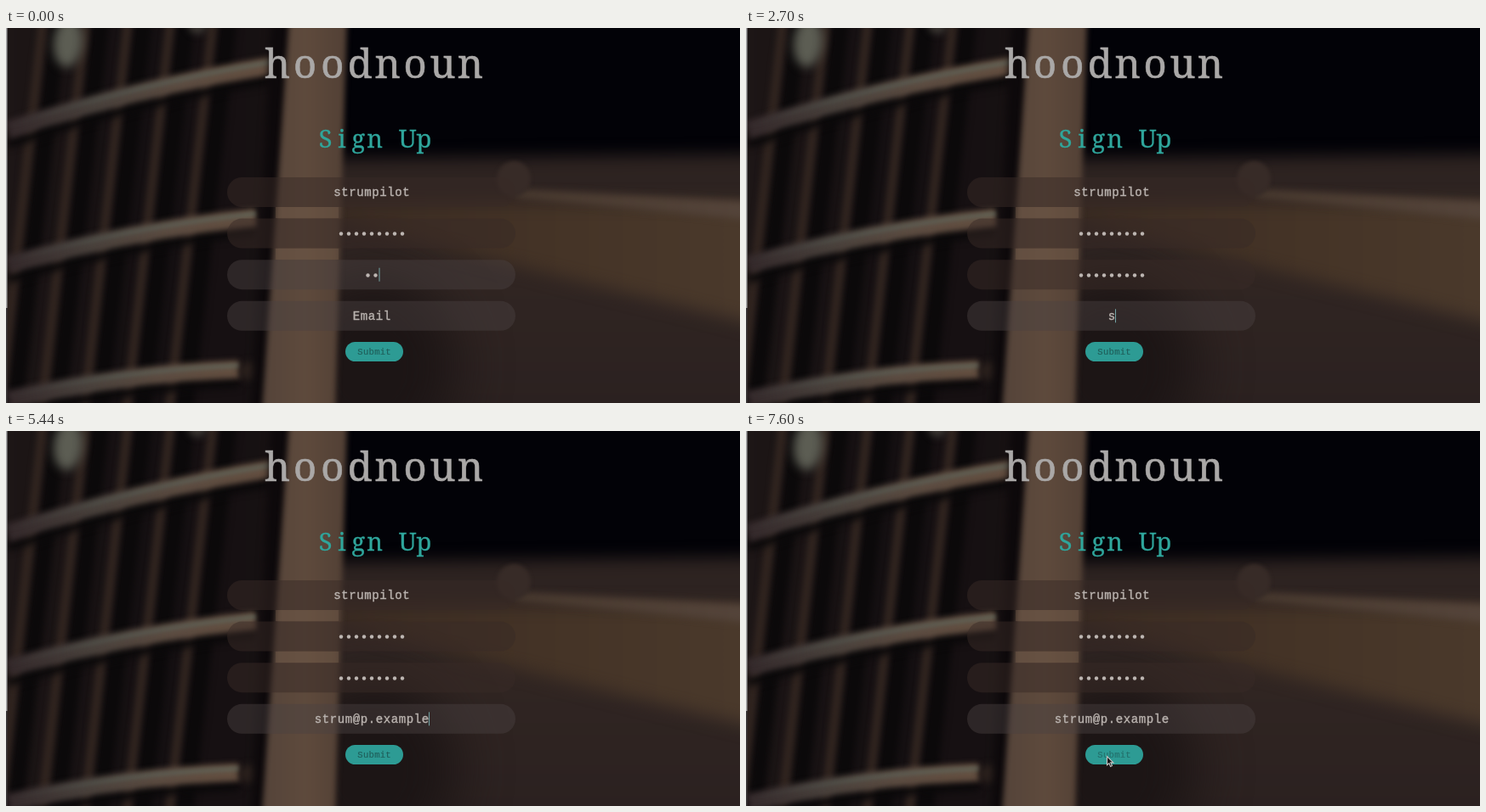
Recreate the animation shown at these times as an HTML page with a canvas. Size 863x442 px, loop 7620 ms.

```html
<!DOCTYPE html>
<html lang="en">
<head>
<meta charset="utf-8">
<title>Sign Up</title>
<style>
html, body { margin: 0; width: 100%; height: 100%; overflow: hidden; background: #060507; }
canvas { display: block; width: 863px; height: 442px; }
</style>
</head>
<body>
<canvas id="stage" width="863" height="442"></canvas>
<script>
const W = 863, H = 442, LOOP = 7620, MID = 430, CELL = 9;
const MONO = '"Liberation Mono", "Courier New", monospace';
const SERIF = '"Noto Serif", "Liberation Serif", serif';
const TITLE = 'hoodnoun', USER = 'strumpilot', MAIL = 'strum@p.example';
const ctx = document.getElementById('stage').getContext('2d');

function ramp(g, x0, y0, x1, y1, ...colors) {
  const fill = g.createLinearGradient(x0, y0, x1, y1);
  colors.forEach((c, i) => fill.addColorStop(i / (colors.length - 1), c));
  return fill;
}

function soft(g, blur, paint) {
  g.filter = `blur(${blur}px)`;
  g.beginPath();
  paint();
  g.filter = 'none';
}

// Strip from the top to the bottom of the stage, leaning by a shift in x.
function slant(g, color, blur, x, width, lean, endWidth = width) {
  soft(g, blur, () => {
    g.fillStyle = color;
    g.moveTo(x, -10);
    g.lineTo(x + width, -10);
    g.lineTo(x + lean + endWidth, H + 10);
    g.lineTo(x + lean, H + 10);
    g.fill();
  });
}

// Band from the neck to the right edge, given its top and height at both ends.
function beam(g, color, blur, x, y, h, endY, endH) {
  soft(g, blur, () => {
    g.fillStyle = color;
    g.moveTo(x, y);
    g.lineTo(W + 30, endY);
    g.lineTo(W + 30, endY + endH);
    g.lineTo(x, y + h);
    g.fill();
  });
}

function oval(g, color, blur, x, y, rx, ry) {
  soft(g, blur, () => {
    g.fillStyle = color;
    g.ellipse(x, y, rx, ry, 0.1, 0, 7);
    g.fill();
  });
}

function fret(g, y, endX, endY) {
  const arc = (color, width, blur, dy) => soft(g, blur, () => {
    g.strokeStyle = color;
    g.lineWidth = width;
    g.moveTo(2, y + dy);
    g.quadraticCurveTo(endX / 2, (y + endY) / 2 - 13 + dy, endX, endY + dy);
    g.stroke();
  });
  arc('#0b090a', 10, 4, 17);
  arc(ramp(g, 0, 0, endX, 0, '#33282a', '#48403b', '#5c4c41', '#644f40'), 21, 3, 0);
  arc(ramp(g, 0, 0, endX, 0, '#56605a00', '#5b6a6260', '#60706580'), 6, 2, -4);
}

function paintBackdrop() {
  const c = document.createElement('canvas');
  c.width = W;
  c.height = H;
  const g = c.getContext('2d');
  g.fillStyle = '#020207';
  g.fillRect(0, 0, W, H);

  // guitar body
  beam(g, ramp(g, 0, 150, 0, H, '#2c2220', '#302522', '#2b2120'), 9, 370, 154, 320, 148, 320);
  beam(g, ramp(g, 390, 0, W, 0, '#3a2b22', '#443326', '#4a392b'), 10, 370, 206, 18, 206, 146);
  beam(g, ramp(g, 590, 0, W, 0, '#493a2f', '#54443a'), 4, 598, 190, 10, 206, 22);
  oval(g, '#1c1515', 30, 430, 400, 100, 110);
  oval(g, '#372b27', 2, 597, 178, 20, 21);

  // fretboard and strings
  slant(g, ramp(g, 0, 0, 320, 0, '#1d1616', '#151012', '#171112'), 2, -70, 406, -28);
  for (let x = 44; x < 260; x += 50) {
    slant(g, '#0b090a', 4, x + 8, 20, -52);
    slant(g, '#30241f', 3, x - 6, 11, -52);
  }
  oval(g, '#5c5d53', 6, 73, 17, 17, 29);
  oval(g, '#3a3632', 4, 225, -3, 11, 10);
  for (let i = 0; i < 3; i++) fret(g, 120 + 159 * i, 314 - 20 * i, 44 + 179 * i);
  oval(g, '#2b211d', 4, 286, 404, 11, 11);

  // neck edge
  slant(g, '#0d090b', 5, 312, 24, -24);
  slant(g, ramp(g, 305, 0, 400, 0, '#55443a', '#5e4a3c', '#524035'), 3, 333, 68, -32, 86);
  for (const y of [211, 260]) {
    g.fillStyle = '#755d4a60';
    g.fillRect(317, y, 74, 13);
  }

  g.fillStyle = '#a9a9aa';
  g.fillRect(0, 0, 1.5, 330);
  g.fillStyle = '#3c393a';
  g.fillRect(0, 330, 1.5, H - 330);
  return c;
}

const backdrop = paintBackdrop();

function pill(x, y, w, h, color) {
  ctx.fillStyle = color;
  ctx.beginPath();
  ctx.roundRect(x, y, w, h, h / 2);
  ctx.fill();
}

// Text on an even grid, one letter centred in each cell.
function label(str, mid, base, font, cell, color, weight) {
  ctx.font = font;
  ctx.textAlign = 'center';
  ctx.fillStyle = ctx.strokeStyle = color;
  ctx.lineWidth = weight;
  [...str].forEach((ch, i) => {
    const x = mid + (i - (str.length - 1) / 2) * cell;
    ctx.fillText(ch, x, base);
    ctx.strokeText(ch, x, base);
  });
}

function field(row, text, lit, caretAt) {
  const y = 176 + row * 48.6;
  pill(260, y, 339, 35, lit ? 'rgba(74,65,65,.45)' : 'rgba(56,43,39,.5)');
  label(text, MID, y + 22, `14px ${MONO}`, CELL, '#b9b2ae', 0.4);
  if (caretAt >= 0) {
    ctx.fillStyle = '#74a5a6';
    ctx.fillRect(MID + caretAt * CELL / 2 - 0.5, y + 9.5, 1, 16);
  }
}

function dots(y, n) {
  ctx.fillStyle = '#bdb6b2';
  for (let i = 0; i < n; i++) {
    ctx.beginPath();
    ctx.arc(MID + (i - (n - 1) / 2) * CELL, y, 2.2, 0, 7);
    ctx.fill();
  }
}

function typed(t, start, step, max) {
  return Math.max(0, Math.min(max, 1 + Math.floor((t - start) / step)));
}

function ease(t, a, b) {
  const p = Math.max(0, Math.min(1, (t - a) / (b - a)));
  return p * p * (3 - 2 * p);
}

function pointer(x, y) {
  ctx.save();
  ctx.translate(x, y);
  ctx.scale(0.85, 0.85);
  ctx.fillStyle = '#161416';
  ctx.strokeStyle = '#c9c6c4';
  ctx.lineWidth = 1.3;
  const arrow = new Path2D('M0 0V12L2.8 9.5 4.8 14 7 13 5 8.7H8.7Z');
  ctx.fill(arrow);
  ctx.stroke(arrow);
  ctx.restore();
}

function draw(t) {
  ctx.drawImage(backdrop, 0, 0);
  label(TITLE, 432.5, 59, `47px ${SERIF}`, 32.4, '#aaa8a7', 0.6);
  label('Sign Up', 433.5, 141, `29px ${SERIF}`, 19.3, '#2fa69c', 0.3);

  const secret = typed(t, -220, 220, 9);
  const mail = MAIL.slice(0, typed(t, 2600, 200, MAIL.length));
  const onMail = t >= 2150;

  field(0, USER, false);
  field(1, '', false);
  field(2, '', !onMail, onMail ? -1 : secret);
  field(3, mail || 'Email', true, onMail && t < 5900 ? mail.length : -1);
  dots(242.5, 9);
  dots(291.5, secret);

  pill(399, 370, 68, 23, '#2d9b94');
  ctx.globalAlpha = 1 - 0.35 * ease(t, 6450, 6700);
  label('Submit', 433, 385, `10.5px ${MONO}`, 6.6, '#20605c', 0.2);
  ctx.globalAlpha = 1;

  if (t >= 6000) {
    const near = ease(t, 6000, 6280), over = ease(t, 6280, 6900);
    pointer(417 + 4.5 * near + 3 * over, 345 + 18.5 * near + 20 * over);
  }
}

function tick() {
  draw(performance.now() % LOOP);
  requestAnimationFrame(tick);
}
tick();
</script>
</body>
</html>
```
